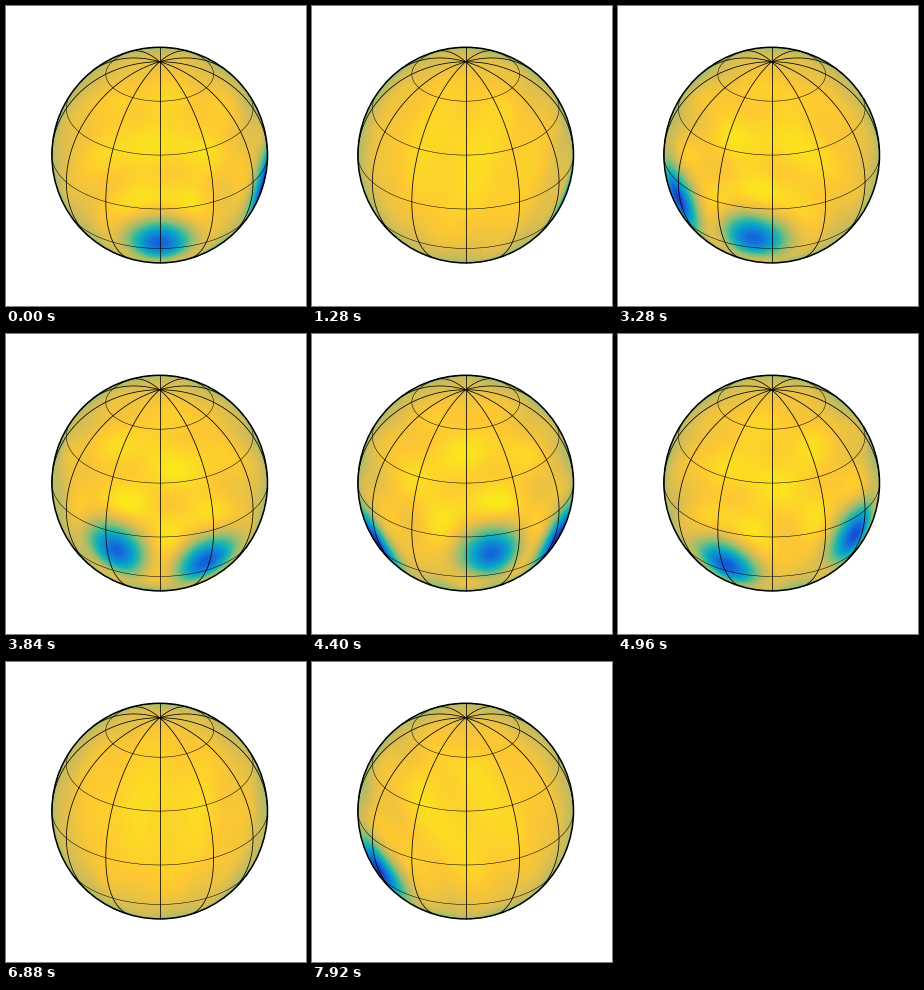
Recreate the animation shown at these times as a matplotlib script. Size 300 by 300 pixels, loop 8000 ms.

```python
import numpy as np
import matplotlib.pyplot as plt
from matplotlib.animation import FuncAnimation
from matplotlib.colors import LinearSegmentedColormap

SIZE, FRAMES, INTERVAL = 300, 100, 80
CX, CY, R = 153.7, 149.1, 107.8
TILT = np.radians(30)               # latitude of the disc centre
STEP = 360 / 67                     # degrees of rotation per frame
SPOTS = [(-23.5, 0), (-11, 77.5), (-20.3, 130.3)]   # latitude, longitude
SPOT_WIDTH, SPOT_DEPTH = 10, .73
RIPPLE, RIPPLE_SPACING, RIPPLE_FADE = .055, 30, 50

cmap = LinearSegmentedColormap.from_list("star", [
    "#352a87", "#0f5cdd", "#1481d6", "#06a4ca", "#2eb7a4",
    "#87bf77", "#d1bb59", "#fec832", "#f9fb0e"], N=512)


def unit(lat, lon):
    lat, lon = np.radians(lat), np.radians(lon)
    return np.array([np.cos(lat) * np.sin(lon),
                     np.sin(lat) + 0 * lon,
                     np.cos(lat) * np.cos(lon)])


def tilt(v, angle):
    """Rotate (right, up, towards viewer) about the horizontal axis."""
    x, y, z = v
    c, s = np.cos(angle), np.sin(angle)
    return np.array([x, c * y - s * z, s * y + c * z])


# Surface point behind every pixel
px, py = np.meshgrid(np.arange(SIZE) + .5, np.arange(SIZE) + .5)
x, y = (px - CX) / R, (CY - py) / R
radius = np.hypot(x, y)
inside = radius < 1.004
x, y = (axis / np.maximum(radius, 1) for axis in (x, y))
depth = np.sqrt(np.clip(1 - x**2 - y**2, 0, 1))
surface = tilt(np.array([x, y, depth])[:, inside], -TILT)
disc = .915 - .28 * (1 - depth[inside]) ** 1.35      # limb darkening


def spot_profile(dist):
    """Dark core with a faint ripple fading outwards (degrees)."""
    core = SPOT_DEPTH * np.exp(-(dist / SPOT_WIDTH) ** 2 / 2)
    wave = np.cos(2 * np.pi * dist / RIPPLE_SPACING)
    return RIPPLE * wave * np.exp(-dist / RIPPLE_FADE) - core


def render(frame):
    value = disc.copy()
    for lat, lon in SPOTS:
        cosine = unit(lat, lon + STEP * frame) @ surface
        value += spot_profile(np.degrees(np.arccos(np.clip(cosine, -1, 1))))
    image = np.ones((SIZE, SIZE, 3))
    image[inside] = cmap(np.clip(value, 0, 1))[:, :3]
    return image


fig = plt.figure(figsize=(3, 3), dpi=100, facecolor="white")
ax = fig.add_axes([0, 0, 1, 1])
ax.axis("off")
picture = ax.imshow(render(0), extent=(0, SIZE, SIZE, 0),
                    interpolation="nearest")


def grid_line(lat, lon, width):
    x, y, depth = tilt(unit(lat, lon), TILT)
    x = np.where(depth > 0, x, np.nan)
    ax.plot(CX + R * x, CY - R * y, color="black", lw=width)


arc = np.linspace(-180, 180, 721)
for lon in range(-180, 180, 30):
    grid_line(arc / 2, np.full_like(arc, lon), .55)
for lat in range(-30, 90, 30):
    grid_line(np.full_like(arc, lat), arc, .36)
ax.add_patch(plt.Circle((CX, CY), R, fill=False, ec="black", lw=1.1, zorder=5))
ax.set_xlim(0, SIZE)
ax.set_ylim(SIZE, 0)


def update(frame):
    picture.set_data(render(frame))
    return [picture]


anim = FuncAnimation(fig, update, frames=FRAMES, interval=INTERVAL,
                     repeat=True, repeat_delay=0)
plt.show()
```
